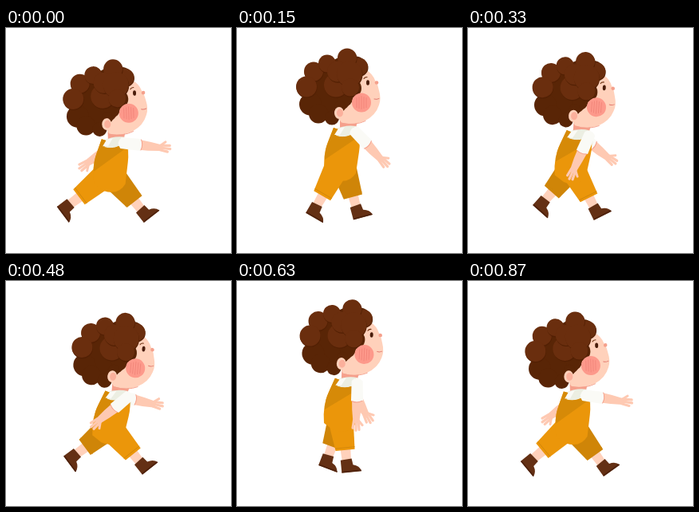
An HTML page with a canvas that plays this animation: 282 by 282 pixels, repeating every 0.9 s.

```html
<!DOCTYPE html>
<html lang="en">
<head>
<meta charset="utf-8">
<title>Walking boy</title>
<style>
html, body { margin: 0; width: 100%; height: 100%; overflow: hidden; background: #fff; }
canvas { display: block; width: 282px; height: 282px; }
</style>
</head>
<body>
<canvas id="stage"></canvas>
<script>
const SIZE = 282, LOOP = 900, STEP = 30;
const canvas = document.getElementById('stage');
const ctx = canvas.getContext('2d');
const dpr = window.devicePixelRatio || 1;
canvas.width = canvas.height = Math.round(SIZE * dpr);

const COLOR = {
  hair: '#592506', curl: '#6a2e0e', rim: '#522004', skin: '#ffd1bb', arm: '#fec9b2',
  blush: '#fd998b', pink: '#f5a08c', near: '#eb960a', far: '#cf8508', shade: '#d68a08',
  shirt: '#fafaf6', fold: '#eceee2', shoe: '#643014', sole: '#4d210c'
};
const RAD = Math.PI / 180;
const PIVOT = [131, 162];

const path = {
  face: new Path2D('M140 50L164 55Q172 60 175 68Q179 74 180 81Q183 91 180 99Q176 112 162 119Q148 125 133 121Q125 112 127 100Z'),
  neck: new Path2D('M129 114L151 117L148 129L129 127Z'),
  shirt: new Path2D('M122 127Q136 121 149 123L155 137L152 151L118 151Z'),
  collar: new Path2D('M127 126L135 124L129 134L122 134Z'),
  overalls: new Path2D('M121 125L127 127L124 135Q134 138 143 134L147 124L152 127Q155 143 153 155L149 182Q140 196 122 190L110 182Q107 160 114 143Z'),
  bibShade: new Path2D('M121 125L127 127L124 135Q134 138 143 134L147 124L152 127L153 136L110 165Q110 152 114 143Z'),
  sleeve: new Path2D('M-7 -4Q0 -11 7 -4L8 21Q1 25 -7 22Z'),
  arm: new Path2D('M-6 18L7 18Q6 34 4 48Q0 54 -4 48Q-6 33 -6 18Z'),
  shoe: new Path2D('M-7 -2L7 -3L8 5Q16 7 18 14L-7 14Z')
};

// x, y, radius
const hairMass = [[118, 80, 31], [137, 60, 22], [151, 51, 13], [146, 78, 12], [137, 91, 10],
  [131, 101, 7], [94, 98, 14], [104, 110, 12], [121, 115, 9]];
const curls = [[98, 57, 12], [115, 47, 11], [155, 51, 11], [140, 40, 12], [89, 76, 13],
  [126, 74, 15], [128, 57, 13], [143, 60, 16], [144, 77, 11]];

function fill(shape, color) {
  ctx.fillStyle = color;
  ctx.fill(shape);
}
function dot(x, y, rx, color, ry = rx) {
  ctx.fillStyle = color;
  ctx.beginPath();
  ctx.ellipse(x, y, rx, ry, 0, 0, 2 * Math.PI);
  ctx.fill();
}
function line(color, width, x, y, ...curve) {
  ctx.strokeStyle = color;
  ctx.lineWidth = width;
  ctx.beginPath();
  ctx.moveTo(x, y);
  if (curve.length > 2) ctx.quadraticCurveTo(...curve);
  else ctx.lineTo(...curve);
  ctx.stroke();
}
// Positive degrees swing a limb forward, to the right.
function limb(x, y, deg, draw) {
  ctx.save();
  ctx.translate(x, y);
  ctx.rotate(-deg * RAD);
  draw();
  ctx.restore();
}

function leg(x, y, deg, hem, ankle, color) {
  limb(x, y, deg, () => {
    fill(new Path2D(`M-6 ${hem - 4}L7 ${hem - 4}L6 ${ankle + 2}L-5 ${ankle + 2}Z`), COLOR.skin);
    ctx.save();
    ctx.translate(0, ankle);
    fill(path.shoe, COLOR.shoe);
    line(COLOR.sole, 1.5, -6, 13, 17, 13);
    ctx.restore();
    fill(new Path2D(`M-18 6Q-16 -8 0 -8Q13 -8 14 6L12 ${hem}L-12 ${hem}Z`), color);
    line(COLOR.far, 0.8, -12, hem - 3, 12, hem - 3);
  });
}

function arm(x, y, deg, length) {
  limb(x, y, deg, () => {
    ctx.scale(1, length);
    fill(path.arm, COLOR.arm);
    [[-4, 57], [0, 60], [4, 59]].forEach(([fx, fy]) => line(COLOR.arm, 3.2, fx * 0.7, 47, fx, fy));
    line(COLOR.arm, 3, 2, 46, 8, 53);
    fill(path.sleeve, COLOR.shirt);
    line(COLOR.pink, 1, -6, 22.5, 1, 25, 7, 21.5);
  });
}

function torso() {
  fill(path.neck, COLOR.pink);
  fill(path.shirt, COLOR.fold);
  fill(path.overalls, COLOR.near);
  fill(path.bibShade, COLOR.shade);
  fill(path.collar, COLOR.shirt);
}

function head() {
  ctx.translate(-2, -2.5);
  fill(path.face, COLOR.skin);
  line(COLOR.pink, 0.9, 134, 122, 150, 125, 163, 119);
  dot(177, 71, 2.3, COLOR.pink);
  hairMass.forEach(([x, y, r]) => dot(x, y, r, COLOR.hair));
  curls.forEach(([x, y, r]) => {
    dot(x + 0.5, y + 1.2, r, COLOR.rim);
    dot(x, y, r, COLOR.curl);
  });
  dot(130, 109, 6, COLOR.skin, 7.5);
  dot(131, 109, 4, '#fbb09c', 5);
  dot(158, 96, 12, COLOR.blush);
  for (let i = -2; i <= 2; i++) {
    const h = 8 - Math.abs(i);
    line('#ee7f74', 0.7, 158 + i * 3, 96 - h, 158 + i * 3, 96 + h);
  }
  dot(166, 71, 2, '#4a1d0b', 3.3);
  line(COLOR.curl, 1.1, 161, 66, 162, 64, 165, 64);
  line('#e27b70', 1, 174, 91.5, 177, 92.5, 180, 91);
}

function upperBody(lift, turn, draw) {
  ctx.save();
  ctx.translate(PIVOT[0], PIVOT[1] + lift);
  ctx.rotate(turn * RAD);
  ctx.translate(-PIVOT[0], -PIVOT[1]);
  draw();
  ctx.restore();
}

const legAngle = c => -6 - 42 * c - 5 * c ** 3;
const armAngle = c => 15 + 52 * c + 16 * c ** 3;

function render(time) {
  const phase = 2 * Math.PI * time / LOOP;
  const swing = Math.cos(phase);
  const stride = swing + 0.06 * Math.sin(2 * phase);
  const lift = 4.7 + 9.3 * Math.cos(2 * phase);
  const turn = 1.8 - 3.6 * swing;

  ctx.setTransform(canvas.width / SIZE, 0, 0, canvas.height / SIZE, 0, 0);
  ctx.fillStyle = '#fff';
  ctx.fillRect(0, 0, SIZE, SIZE);
  ctx.lineCap = 'round';

  upperBody(lift, turn, () => arm(139, 131, armAngle(-swing) - 3 + turn, 0.93));
  leg(134, 169 + lift, legAngle(-stride) - 3, 44, 58, COLOR.far);
  leg(131, 168 + lift, legAngle(stride), 47.5 + 2 * stride, 62 + 3 * stride, COLOR.near);
  upperBody(lift, turn, () => {
    torso();
    arm(149, 131, armAngle(swing) + turn, 0.97);
    head();
  });
}

const start = performance.now();
function tick() {
  const time = (performance.now() - start) % LOOP;
  render(Math.floor(time / STEP) * STEP);
  requestAnimationFrame(tick);
}
tick();
</script>
</body>
</html>
```
